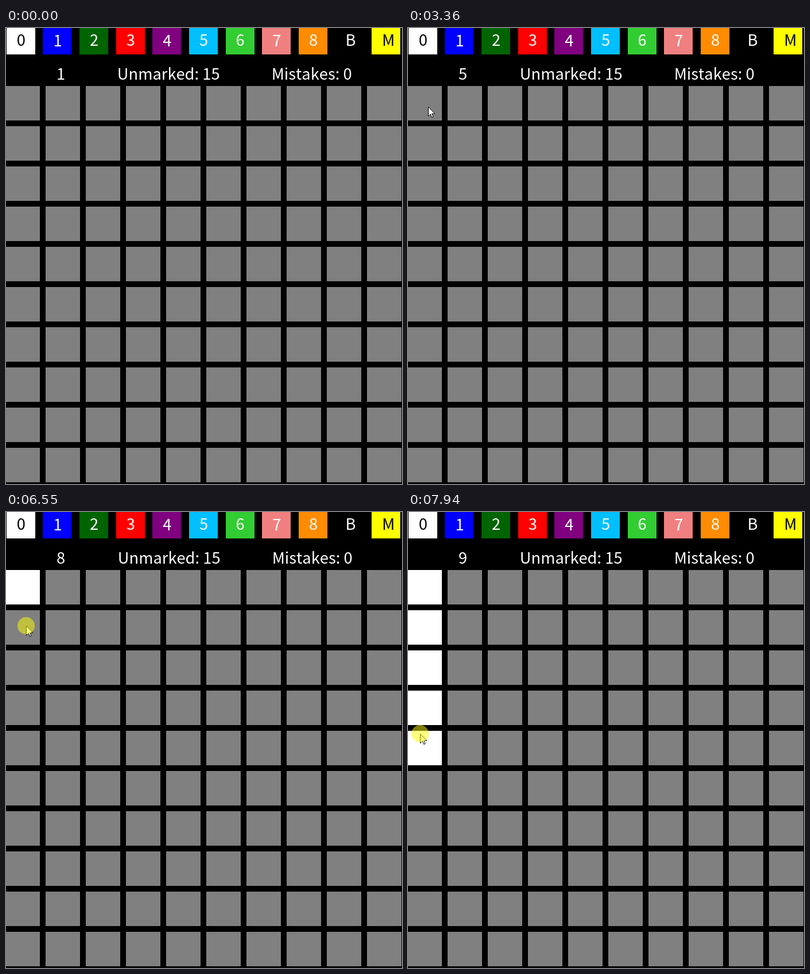
An HTML page for the animation above (8000 ms loop, 690x794 px).

```html
<!DOCTYPE html>
<html lang="en">
<head>
<meta charset="utf-8">
<title>Mine grid</title>
<style>
  html, body { margin: 0; width: 100%; height: 100%; overflow: hidden; background: #000; }
  svg { display: block; width: 690px; height: 794px; }
  rect { shape-rendering: crispEdges; }
  text {
    font: 27.3px "Noto Sans CJK JP", "Noto Sans CJK SC", "Noto Sans CJK", sans-serif;
    font-kerning: none;
    fill: #fff;
  }
  .middle { text-anchor: middle; }
</style>
</head>
<body>
<svg viewBox="0 0 690 794">
  <g id="legend"></g>
  <g class="middle">
    <text id="count" x="95.5" y="90">1</text>
    <g id="status">
      <text x="283.2" y="90">Unmarked: 15</text>
      <text x="532.6" y="90">Mistakes: 0</text>
    </g>
  </g>
  <g id="board"></g>
  <g id="pointer">
    <path d="M.5 .5V16.6L4.2 13.1 6.6 18.6 9 17.6 6.6 12.2H11.8Z" fill="#fff" stroke="#000"/>
    <circle id="press" r="15" fill="#ff0" fill-opacity=".5"/>
  </g>
</svg>
<script>
const LOOP = 8000, STEP = 77, SECOND = 994;
const $ = id => document.getElementById(id);

function add(parent, tag, attrs, content = '') {
  const el = document.createElementNS('http://www.w3.org/2000/svg', tag);
  for (const key in attrs) el.setAttribute(key, attrs[key]);
  el.textContent = content;
  parent.append(el);
}

const colours = ['white', 'blue', 'darkgreen', 'red', 'purple', 'deepskyblue',
  'limegreen', 'lightcoral', 'darkorange', 'black', 'yellow'];

[...'012345678BM'].forEach((label, i) => {
  const left = 1.3 + i * 700 / 11;
  const y = '147'.includes(label) ? 32 : 31; // flat-footed digits sit lower
  const ink = '0M'.includes(label) ? '#000' : '#fff';
  add($('legend'), 'rect', { x: Math.floor(left), y: 0, width: 50, height: 46, fill: colours[i] });
  add($('legend'), 'text', { x: left + 17.5, y, style: `fill:${ink}` }, label);
});

for (let i = 0; i < 100; i++) {
  const x = i % 10 * 70 - 1, y = 101 + Math.floor(i / 10) * 70;
  add($('board'), 'rect', { x, y, width: 60, height: 60 });
}

// Pointer strokes: first step, last step, end point
const entry = { x: 741, y: 1022 };
const strokes = [
  { from: 950, to: 1120, x: 171, y: 241 },
  { from: 1580, to: 1650, x: 165, y: 240 },
  { from: 1810, to: 2130, x: 88, y: 168 },
  { from: 2190, to: 2580, x: 35, y: 137 },
  { from: 5470, to: 5780, x: 35, y: 198 },
  { from: 6770, to: 7010, x: 32, y: 243 },
  { from: 7230, to: 7460, x: 28, y: 324 },
  { from: 7620, to: 7860, x: 21, y: 386 }
];

// Each click reveals the next cell down the first column
const clicks = [
  { down: 5120, up: 5240 }, { down: 6550, up: 6620 }, { down: 7010, up: 7160 },
  { down: 7460, up: 7540 }, { down: 7860, up: LOOP }
];
const REVEAL_DELAY = 70;

// The pointer advances in equal hard steps along each stroke
function pointerAt(t) {
  const i = strokes.findLastIndex(s => s.from <= t);
  if (i < 0) return entry;
  const start = strokes[i - 1] ?? entry, end = strokes[i];
  const gaps = Math.round((end.to - end.from) / STEP);
  const done = Math.floor((t - end.from) / (end.to - end.from) * gaps + .1);
  const p = Math.min(1, (done + 1) / (gaps + 1));
  return {
    x: Math.round(start.x + (end.x - start.x) * p),
    y: Math.round(start.y + (end.y - start.y) * p)
  };
}

const move = (el, x, y) => el.setAttribute('transform', `translate(${x} ${y})`);

function render(t) {
  const count = Math.floor((t + 664) / SECOND) + 1;
  $('count').textContent = count;
  move($('status'), count % 3 === 1 ? 0 : 1, 0);

  const { x, y } = pointerAt(t);
  move($('pointer'), x, y);
  const pressed = clicks.some(({ down, up }) => t >= down && t < up);
  $('press').setAttribute('visibility', pressed ? 'visible' : 'hidden');

  const revealed = clicks.filter(({ down }) => t >= down + REVEAL_DELAY).length;
  [...$('board').children].forEach((cell, i) => {
    const open = i % 10 === 0 && i / 10 < revealed;
    cell.setAttribute('fill', open ? '#fff' : '#808080');
  });
}

const start = performance.now();
function frame() {
  render((performance.now() - start) % LOOP);
  requestAnimationFrame(frame);
}
frame();
</script>
</body>
</html>
```
